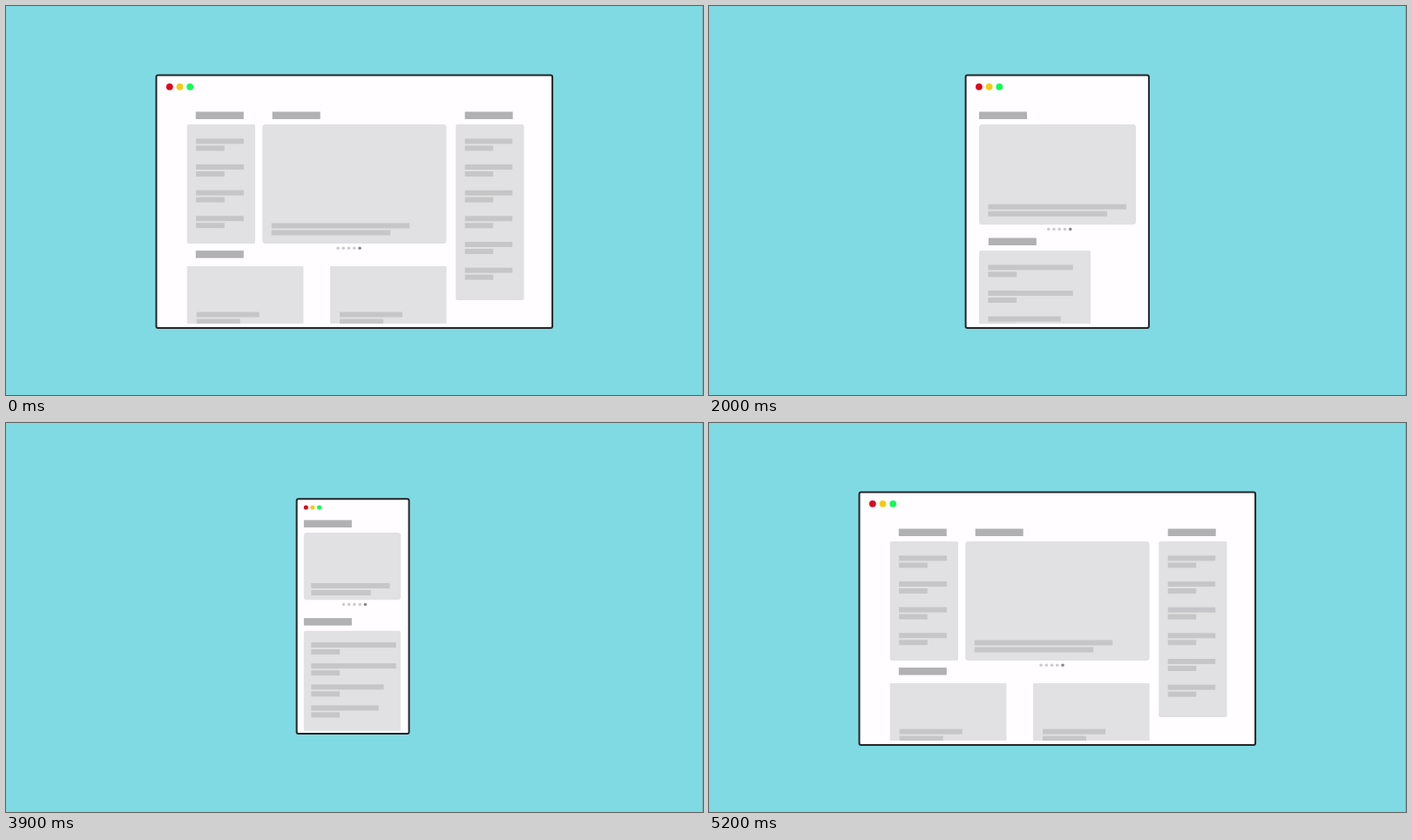
Recreate the animation shown at these times as an HTML page with a canvas. Size 800 by 447 pixels, loop 5.3 s.

```html
<!DOCTYPE html>
<html lang="en">
<head>
<meta charset="utf-8">
<title>Responsive layout</title>
<style>
  html, body { margin: 0; width: 100%; height: 100%; overflow: hidden; background: #80dae3; }
  canvas { display: block; width: 800px; height: 447px; }
</style>
</head>
<body>
<canvas id="stage" width="800" height="447"></canvas>
<script>
const ctx = document.getElementById('stage').getContext('2d');
const LOOP = 5300, STEP = 100;
const BACK = '#80dae3', EDGE = '#7ab8bf', PAPER = '#fffdff', INK = '#262427';
const PANEL = '#e1e0e2', LINE = '#c6c5c7', TITLE = '#b1b0b2';
const LIGHTS = ['#dc0820', '#f6cb14', '#12fb55'];

// Boxes are x, y, width, height; all other parts are placed from these values
const desktop = {
  win: [172.5, 79.4, 454.6, 290.5], hero: [294.3, 136, 211.3, 137], side: [207.7, 136, 78.3, 137],
  heroInset: 11.4, sideInset: 10.1, text: 158.5, dots: 381, scale: 1, chrome: 1, stack: 0
};
const tablet = {
  ...desktop,
  win: [294.6, 79.4, 210.3, 290.5], hero: [310, 136, 180, 115.2], side: [310, 281, 128, 137],
  heroInset: 0, sideInset: 10.8, dots: 389.7, stack: 1
};
const phone = {
  ...tablet,
  win: [333.8, 87.2, 128.6, 269.7], hero: [342, 126, 111, 77], side: [342, 238.5, 111, 138],
  sideInset: 0, text: 90, dots: 387.4, scale: 0.815, chrome: 0.65
};
const MOVES = [
  { at: 1100, time: 900, from: desktop, to: tablet },
  { at: 3100, time: 900, from: tablet, to: phone },
  { at: 4364, time: 750, from: phone, to: desktop }
];

// Smoothstep with a longer settling tail
function ease(u) {
  const s = 1 - (1 - u) ** 1.5;
  return s * s * (3 - 2 * s);
}

function mix(a, b, p) {
  return Array.isArray(a) ? a.map((v, i) => mix(v, b[i], p)) : a + (b - a) * p;
}

function layoutAt(t) {
  const move = MOVES.findLast(m => t >= m.at);
  if (!move) return desktop;
  const p = ease(Math.min(1, (t - move.at) / move.time));
  return Object.fromEntries(Object.keys(desktop).map(k => [k, mix(move.from[k], move.to[k], p)]));
}

function box(x, y, w, h, r, color) {
  ctx.fillStyle = color;
  ctx.beginPath();
  ctx.roundRect(x, y, w, h, r);
  ctx.fill();
}

function disc(x, y, r, color) {
  ctx.fillStyle = color;
  ctx.beginPath();
  ctx.arc(x, y, r, 0, Math.PI * 2);
  ctx.fill();
}

function line(x, y, w) {
  ctx.fillStyle = LINE;
  ctx.fillRect(x, y, w, 6);
}

function pair(x, y, first, second) {
  line(x, y, first);
  line(x, y + 8, second);
}

function title(x, y) {
  ctx.fillStyle = TITLE;
  ctx.fillRect(x, y - 14.5, 55, 8.5);
}

function drawPage({ hero, side, heroInset, sideInset, text, dots, scale, stack }) {
  const pad = 10.4 * scale, bottom = hero[1] + hero[3];
  // The right column and the cards slide below the fold as the page stacks
  const rightX = 516.2 - 214 * stack, rightY = 136 + 310 * stack;
  const cardY = 299 + 96 * stack;
  const cards = [207.7, 372].map(x => x + 96 * stack);

  box(...hero, 3.5, PANEL);
  box(...side, 2, PANEL);
  box(rightX, rightY, 78.3, 202, 2, PANEL);
  for (const x of cards) box(x, cardY, 133.7, 90, 1, PANEL);

  pair(hero[0] + pad, bottom - 23.5 * scale, text, text - 22);
  [42.5, 42.5, 28.5, 22.5].forEach((grow, i) => {
    pair(side[0] + pad, side[1] + (16.4 + 29.6 * i) * scale, 54.8 + grow * stack, 32.7);
  });
  for (let i = 0; i < 6; i++) pair(rightX + 10.5, rightY + 16.4 + 29.65 * i, 54.5, 32.5);
  for (const x of cards) pair(x + 11, cardY + 52.6, 72, 50);
  for (let i = 0; i < 5; i++) disc(dots + 6.25 * i, bottom + 5.2, 1.75, i < 4 ? '#cccbcd' : '#858486');

  title(hero[0] + heroInset, hero[1]);
  title(side[0] + sideInset, side[1]);
  title(rightX + 10.5, rightY);
  title(cards[0] + 10.1, cardY - 3.4);
}

function draw(t) {
  const layout = layoutAt(t);
  const { win, chrome } = layout;
  const [x, y, w, h] = win;
  ctx.fillStyle = BACK;
  ctx.fillRect(0, 0, 800, 447);
  ctx.fillStyle = EDGE;
  ctx.fillRect(799, 0, 1, 447);
  box(...win, 2, PAPER);

  ctx.save();
  ctx.beginPath();
  ctx.rect(x, y, w, h - 5 * chrome);
  ctx.clip();
  drawPage(layout);
  ctx.restore();

  LIGHTS.forEach((color, i) => {
    disc(x + 2 + (13.3 + 11.7 * i) * chrome, y + 3 + 10.4 * chrome, 3.9 * chrome, color);
  });
  ctx.strokeStyle = INK;
  ctx.lineWidth = 2;
  ctx.beginPath();
  ctx.roundRect(...win, 2);
  ctx.stroke();
}

const start = performance.now();
function tick() {
  const t = (performance.now() - start) % LOOP;
  draw(Math.floor(t / STEP) * STEP);
  requestAnimationFrame(tick);
}
tick();
</script>
</body>
</html>
```
